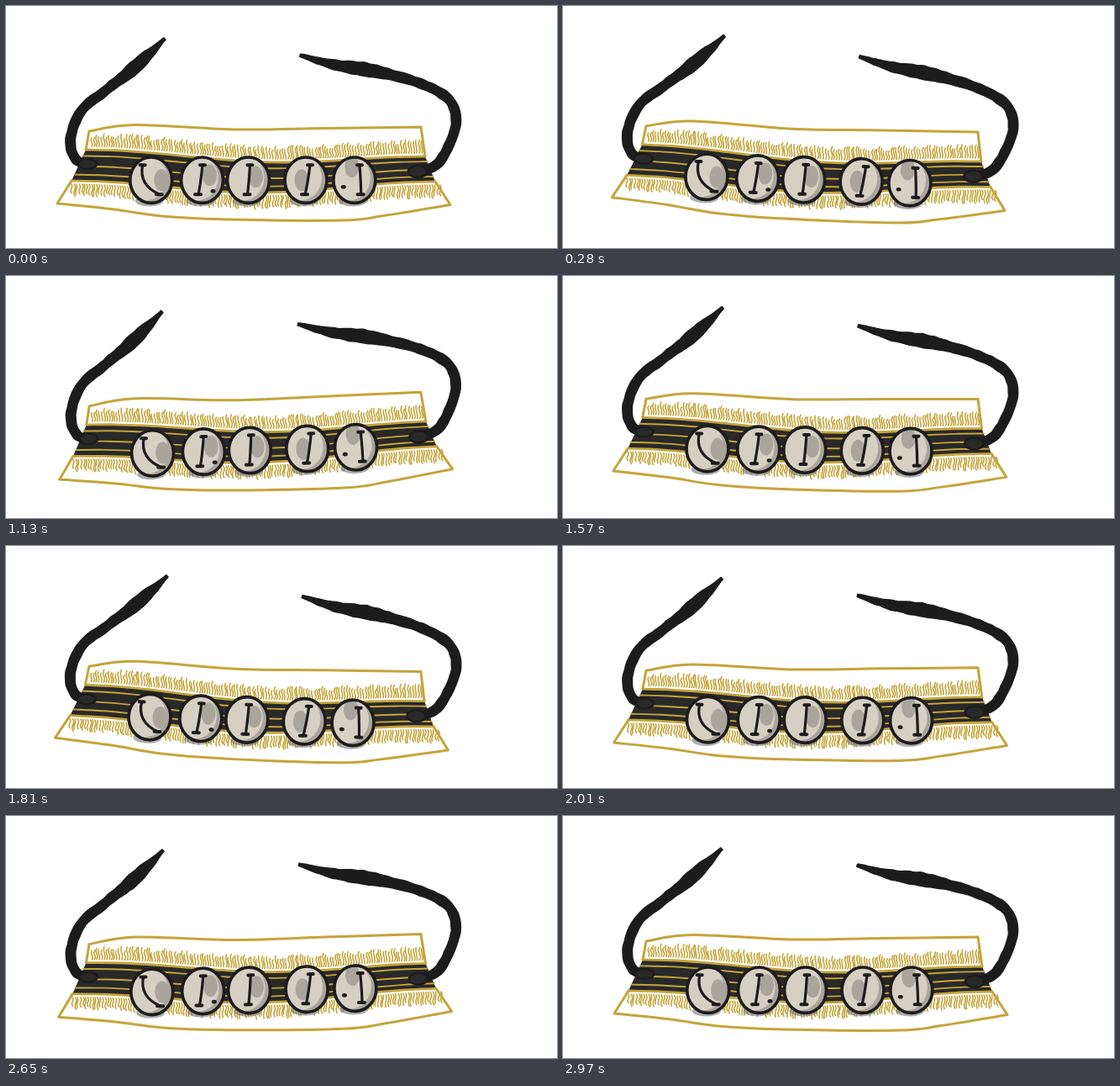
These frames come from a looping animation (656 px wide and 288 px high, 3.01 s). An HTML page:

```html
<!DOCTYPE html>
<html lang="en">
<head>
<meta charset="utf-8">
<title>Bell strap</title>
<style>
html, body { margin: 0; width: 100%; height: 100%; overflow: hidden; background: #fff; }
svg { display: block; }
path, ellipse { stroke-linecap: round; stroke-linejoin: round; }
</style>
</head>
<body>
<svg width="656" height="288" viewBox="0 0 656 288"><g id="strap"></g></svg>
<script>
const GOLD = '#c5a43a', INK = '#1c1c1d', BAND = '#29292a', CREAM = '#d6d0c2', GREY = '#aaa59b';
const strap = document.getElementById('strap');

let seed = 11;
const rand = () => (seed = seed * 16807 % 2147483647) / 2147483647;
const mix = (a, b, u) => a + (b - a) * u;
const clamp = u => Math.max(0, Math.min(1, u));

function add(tag, attrs, parent = strap) {
  const el = document.createElementNS('http://www.w3.org/2000/svg', tag);
  for (const k in attrs) el.setAttribute(k, attrs[k]);
  return parent.appendChild(el);
}

// Smooth curve through a list of points
function curve(pts) {
  const at = i => pts[Math.max(0, Math.min(pts.length - 1, i))];
  let d = 'M' + pts[0];
  for (let i = 0; i < pts.length - 1; i++) {
    const [a, b, c, e] = [at(i - 1), at(i), at(i + 1), at(i + 2)];
    const p = [0, 1].map(k => b[k] + (c[k] - a[k]) / 6);
    const q = [0, 1].map(k => c[k] - (e[k] - b[k]) / 6);
    d += `C${p} ${q} ${c}`;
  }
  return d;
}

const stroke = (d, color, width, parent) =>
  add('path', { d, fill: 'none', stroke: color, 'stroke-width': width }, parent);
const joined = (a, b) => curve(a) + curve(b).replace('M', 'L') + 'Z';

// The band sags in the middle; v runs from its upper edge (0) to its lower edge (1)
const ease = u => (1 - Math.cos(Math.PI * clamp(u))) / 2;
const bandLeft = v => mix(95, 78, v);
const bandRight = v => mix(499, 511, v);
function bandY(x, v) {
  const mid = mix(330, 300, v);
  const rise = x < mid
    ? mix(15, 14, v) * ease((mid - x) / (mid - bandLeft(v)))
    : mix(7, 13, v) * ease((x - mid) / (bandRight(v) - mid));
  return mix(186, 222, v) - rise;
}
function bandLine(v) {
  return Array.from({ length: 13 }, (_, i) => {
    const x = mix(bandLeft(v), bandRight(v), i / 12);
    return [x, bandY(x, v)];
  });
}

function fringe(v, from, to, dir) {
  let d = '';
  for (let x = from; x < to; x += 2.5 + rand()) {
    const y = bandY(x, v) + dir * 4, len = 10 + rand() * 6, sway = rand() * 2 - 1;
    d += `M${x} ${y}q${sway + 1.5} ${dir * len / 4} ${sway / 2} ${dir * len / 2}` +
         `t${sway / 2} ${dir * len / 2}`;
  }
  stroke(d, GOLD, 1.6);
}

// Cloth
const hem = [[99, 149], [154, 141.5], [273, 147], [380, 145.5], [494, 144]];
const foot = [[61, 235], [128, 242], [185, 250], [262, 254], [400, 255], [450, 249.5], [529, 236.5]];
stroke('M95 171' + curve(hem).replace('M', 'L') + 'L499 179', GOLD, 3);
stroke('M78 208' + curve(foot).replace('M', 'L') + 'L511 209', GOLD, 3);
fringe(0, 102, 497, -1);
fringe(1, 78, 519, 1);

// Band with its gold lines
add('path', { d: joined(bandLine(0), bandLine(1).reverse()), fill: BAND });
for (const v of [0, .2, .53, .8, 1])
  stroke(curve(bandLine(v)), GOLD, v % 1 ? 1.9 : 2.8);

// Bells: centre, slot offset and lean, grey patch offset, optional dot
const RX = 25, RY = 27.2, CY = 207.2;
const bells = [
  { x: 172.7, slot: 0, lean: 10, bend: -15, patch: [12, 0] },
  { x: 233.5, slot: -2, lean: -2.5, bend: 0, patch: [9, -6], dot: [13, 13] },
  { x: 288.5, slot: .5, lean: -1.5, bend: 0, patch: [9, -4] },
  { x: 357, slot: 2, lean: -3, bend: 0, patch: [-5, 0] },
  { x: 414.8, slot: 7, lean: .8, bend: 1, patch: [-3, -16], dot: [-13, 8] }
];

bells.forEach(b => add('ellipse', { cx: b.x - 2, cy: 232, rx: 17, ry: 6.5, fill: '#777', opacity: .6 }));

bells.forEach(({ x, slot, lean, bend, patch, dot }, i) => {
  const g = add('g', { transform: `translate(${x} ${CY})` });
  add('ellipse', { rx: RX, ry: RY }, add('clipPath', { id: 'bell' + i }, g));
  const face = add('g', { 'clip-path': `url(#bell${i})` }, g);
  add('ellipse', { rx: RX, ry: RY, fill: GREY }, face);
  add('ellipse', { cx: -6, cy: -3, rx: RX, ry: RY, fill: CREAM }, face);
  add('ellipse', { cx: patch[0], cy: patch[1], rx: 8.5, ry: 13, fill: GREY }, face);
  add('ellipse', { rx: RX, ry: RY, fill: 'none', stroke: INK, 'stroke-width': 3.7 }, g);
  const top = slot - lean, low = slot + lean;
  stroke(`M${top} -18Q${slot + bend} 6 ${low} 17`, INK, 3.2, g);
  stroke(`M${top - 3} -18h6M${low - 4} 17h7`, INK, 4, g);
  if (dot) add('ellipse', { cx: dot[0], cy: dot[1], rx: 3, ry: 2.3, fill: INK }, g);
});

// Rope along a curve: tapered tip, one bulge, slightly rough edges
function rope(pts, bulge, at) {
  const spine = stroke(curve(pts), 'none', 0);
  const len = spine.getTotalLength(), n = Math.round(len / 7);
  const sides = [[], []];
  for (let i = 0; i <= n; i++) {
    const u = i / n;
    const p = spine.getPointAtLength(u * len);
    const a = spine.getPointAtLength(u * len - 2), b = spine.getPointAtLength(u * len + 2);
    const angle = Math.atan2(b.y - a.y, b.x - a.x);
    const half = 5.6 * clamp(.3 + u * 5) + bulge * Math.exp(-(((u - at) / .09) ** 2));
    sides.forEach((side, k) => {
      const r = (half + rand() - .5) * (k ? -1 : 1);
      side.push([p.x - Math.sin(angle) * r, p.y + Math.cos(angle) * r]);
    });
  }
  add('path', { d: joined(sides[0], sides[1].reverse()), fill: INK, stroke: INK, 'stroke-width': 1.4 });
}

rope([[189, 39], [151, 75], [118, 101], [92, 122], [79, 148], [77, 168], [85, 184], [97, 188]], 1.8, .23);
rope([[350, 59], [391, 70], [438, 77.5], [490, 91], [526, 110], [536, 136], [527, 167], [511, 190], [490, 197]], 2.4, .27);

// Knots
for (const [cx, cy, ry] of [[97, 188, 6], [490, 197, 7]])
  add('ellipse', { cx, cy, rx: 11, ry, fill: BAND, stroke: INK, 'stroke-width': 2.5 });

// Swing: tilt and hold, rock to and fro, settle (ms, degrees)
const LOOP = 3010, STEP = 40, TILT = 2, HOLD = 320, GO = 610, ROCK = 595, HALF = 580, END = 2970;
const LAST = ROCK + 3 * HALF;

function angleAt(t) {
  if (t < ROCK) return TILT * clamp(t / HOLD);
  if (t > LAST) return -TILT * clamp((END - t) / (END - LAST));
  const phase = (t - ROCK) / HALF % 2;
  return TILT * (2 * Math.abs(phase - 1) - 1);
}

function draw(time) {
  const t = time % LOOP;
  const from = t < GO ? 0 : GO;
  const shown = from + Math.floor((t - from) / STEP) * STEP;
  strap.setAttribute('transform', `rotate(${angleAt(shown)} 300 146)`);
}

const start = performance.now();
function tick() {
  draw(performance.now() - start);
  requestAnimationFrame(tick);
}
tick();
</script>
</body>
</html>
```
